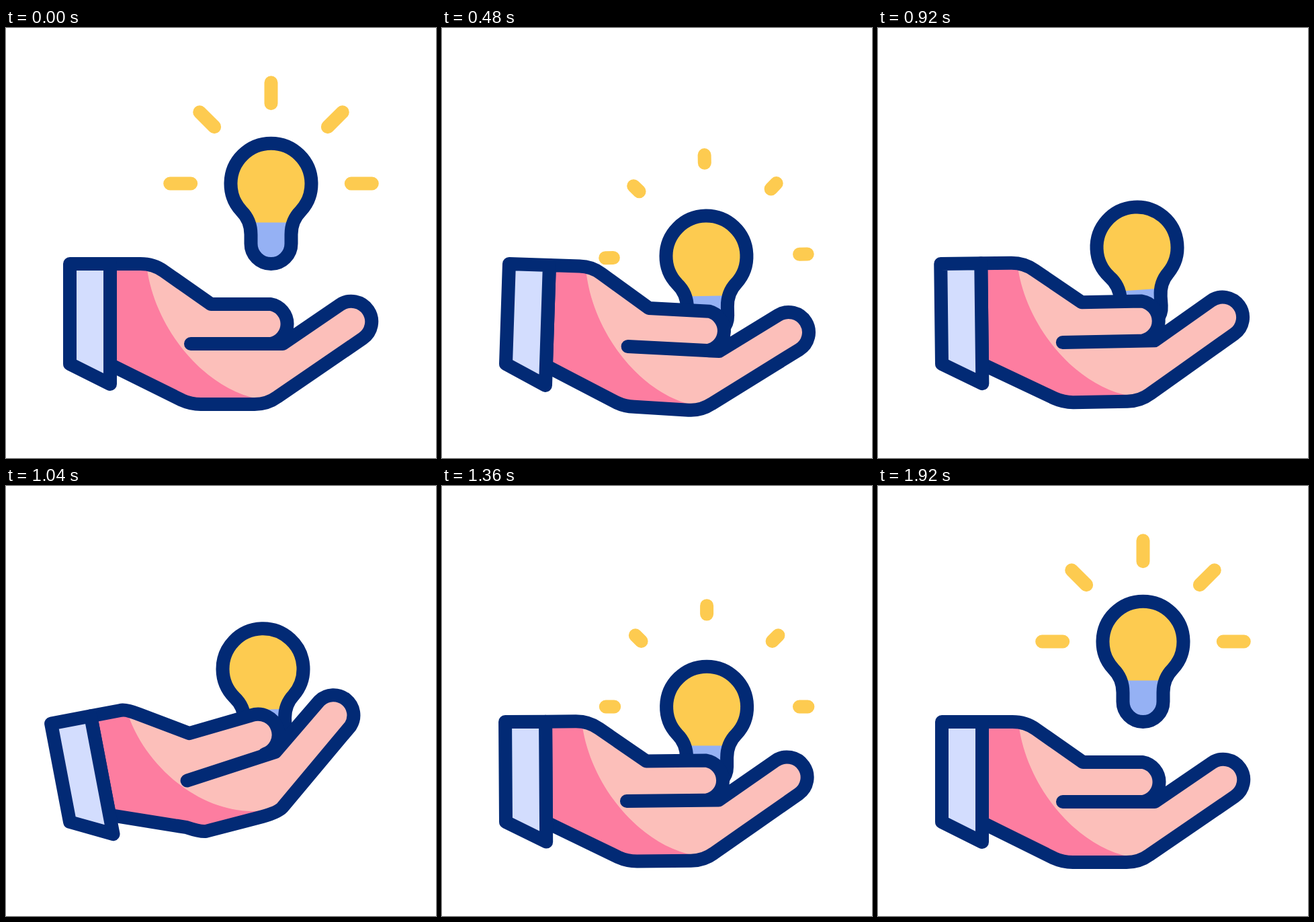
Write an HTML page that moves like this. It is 640 px wide and 640 px high and loops after 2 s.

```html
<!DOCTYPE html>
<html lang="en">
<head>
<meta charset="utf-8">
<title>Idea in hand</title>
<style>
  html, body { margin: 0; width: 100%; height: 100%; overflow: hidden; background: #fff; }
  svg { display: block; width: 100%; height: 100%; }
  .line { fill: none; stroke: #022a75; stroke-width: 20; stroke-linecap: round; stroke-linejoin: round; }
  #rays { fill: none; stroke: #fdcb50; stroke-width: 20; stroke-linecap: round; }
</style>
</head>
<body>
<svg viewBox="0 0 640 640">
  <defs>
    <path id="glass" d="M-44 41A60 60 0 1 1 44 41C35 50 30 62 30 76V89.5A30 30 0 0 1 -30 89.5V76C-30 62 -35 50 -44 41Z"/>
    <clipPath id="inGlass"><use href="#glass"/></clipPath>
    <clipPath id="inHand"><path id="handClip"/></clipPath>
  </defs>
  <g id="bulb">
    <path id="rays"/>
    <use href="#glass" fill="#fdcb50"/>
    <g clip-path="url(#inGlass)"><rect id="base" x="-90" width="180" height="90" fill="#95b1f4"/></g>
    <use href="#glass" class="line"/>
  </g>
  <path id="handFill" fill="#fcbfba"/>
  <g clip-path="url(#inHand)"><path id="shade" fill="#fd7da0"/></g>
  <path id="handLine" class="line"/>
  <path id="cuffFill" fill="#d3ddfe"/>
  <path id="cuffLine" class="line"/>
</svg>
<script>
const LOOP = 2000, STEP = 40;
const PIVOT = [95, 500];
const $ = id => document.getElementById(id);

// Each point: rest x, y, then its extra bend when the hand dips and when it lifts.
const HAND = {
  wristTop: [155, 351],
  backA:    [200, 351],
  backC:    [220, 351, -11, -2, -7, 1],
  backB:    [235, 362, -12, -5, -5, 1],
  knuckle:  [305, 411, 0, -6, -7, -3],
  tipTop:   [394, 411, 5, 4, -4, -9],
  tipLow:   [394, 470, -1, 2, 1, -9],
  crease:   [275, 470, 4, -11, 2, 1],
  fork:     [412, 470, -1, 3, 0, -9],
  thumbA:   [497, 412, 2, 11, -4, -11],
  thumbB:   [531, 462, -2, 12, -2, -14],
  heelA:    [404, 549, -5, 1, 3, -8],
  heelC:    [389, 560, -9, 1, 7, -11],
  heelB:    [370, 560, -5, -2, 3, -9],
  palmA:    [290, 560, -9, -14, 0, -5],
  palmC:    [275, 560, -4, -14, 4, -6],
  palmB:    [262, 554, 0, -10, 0, -8],
  wristLow: [155, 501],
  shadeA:   [209, 351],
  shadeC:   [218, 440],
  shadeD:   [290, 535, 0, 0, 0, -4],
  shadeB:   [375, 552, 0, 0, 0, -9],
  shadeE:   [375, 600],
  shadeF:   [155, 600],
  cuffTop:  [95, 351],
  cuffLow:  [155, 530],
  cuffEnd:  [95, 500]
};

const smooth = u => u * u * (3 - 2 * u);
const linear = u => u;

function track(t, keys, ease = smooth) {
  if (t <= keys[0][0]) return keys[0][1];
  for (let i = 1; i < keys.length; i++) {
    const [t0, a] = keys[i - 1], [t1, b] = keys[i];
    if (t < t1) return a + (b - a) * ease((t - t0) / (t1 - t0));
  }
  return keys[keys.length - 1][1];
}

function posedHand(pose) {
  const angle = pose * (pose > 0 ? 10.2 : 10.8) * Math.PI / 180;
  const c = Math.cos(angle), s = Math.sin(angle);
  const dip = Math.max(pose, 0), lift = Math.max(-pose, 0) * 1.7;
  const out = {};
  for (const [name, [x, y, dx = 0, dy = 0, ux = 0, uy = 0]] of Object.entries(HAND)) {
    const rx = x - PIVOT[0], ry = y - PIVOT[1];
    const px = PIVOT[0] + rx * c - ry * s + dx * dip + ux * lift;
    const py = PIVOT[1] + rx * s + ry * c + dy * dip + uy * lift;
    out[name] = px.toFixed(2) + ' ' + py.toFixed(2);
  }
  return out;
}

function drawHand(pose) {
  const p = posedHand(pose);
  const outline = `M${p.wristTop}L${p.backA}Q${p.backC} ${p.backB}L${p.knuckle}L${p.tipTop}` +
    `A30 30 0 0 1 ${p.tipLow}L${p.fork}L${p.thumbA}A30 30 0 0 1 ${p.thumbB}` +
    `L${p.heelA}Q${p.heelC} ${p.heelB}L${p.palmA}Q${p.palmC} ${p.palmB}L${p.wristLow}Z`;
  const cuff = `M${p.cuffTop}L${p.wristTop}L${p.cuffLow}L${p.cuffEnd}Z`;
  $('handFill').setAttribute('d', outline);
  $('handClip').setAttribute('d', outline);
  $('handLine').setAttribute('d', `${outline}M${p.crease}L${p.fork}`);
  $('shade').setAttribute('d',
    `M${p.wristTop}L${p.shadeA}C${p.shadeC} ${p.shadeD} ${p.shadeB}L${p.shadeE}L${p.shadeF}Z`);
  $('cuffFill').setAttribute('d', cuff);
  $('cuffLine').setAttribute('d', cuff);
}

function rayPath(length) {
  if (length < 0.01) return '';
  let d = '';
  for (let i = 0; i < 5; i++) {
    const a = Math.PI * (1 + i / 4), outer = 150.3;
    const at = r => `${(r * Math.cos(a)).toFixed(2)} ${(r * Math.sin(a)).toFixed(2)}`;
    d += `M${at(outer)}L${at(outer - length)}`;
  }
  return d;
}

function drawBulb(t, pose) {
  const drop = track(t, [[80, 0], [440, 98], [1550, 99], [1920, 0]]);
  const x = 394.5 + track(t, [[360, 0], [795, -5.6], [1035, -12], [1400, 0]]);
  const y = 231.5 + drop + pose * (pose > 0 ? 53 : 58);
  const tilt = track(t, [[340, 0], [760, -4.2], [920, -4], [1160, 0]]);
  const ray = track(t, [[80, 31], [720, 0], [1040, 0], [1840, 31]], linear);
  $('bulb').setAttribute('transform', `translate(${x} ${y}) rotate(${tilt})`);
  $('base').setAttribute('y', 58 - tilt * 1.4);
  $('rays').setAttribute('d', rayPath(ray));
}

function draw(t) {
  const pose = track(t, [[360, 0], [795, 1], [1035, -1], [1400, 0]]);
  drawHand(pose);
  drawBulb(t, pose);
}

let start;
function tick(now) {
  start ??= now;
  draw(Math.floor((now - start) % LOOP / STEP) * STEP);
  requestAnimationFrame(tick);
}
draw(0);
requestAnimationFrame(tick);
</script>
</body>
</html>
```
